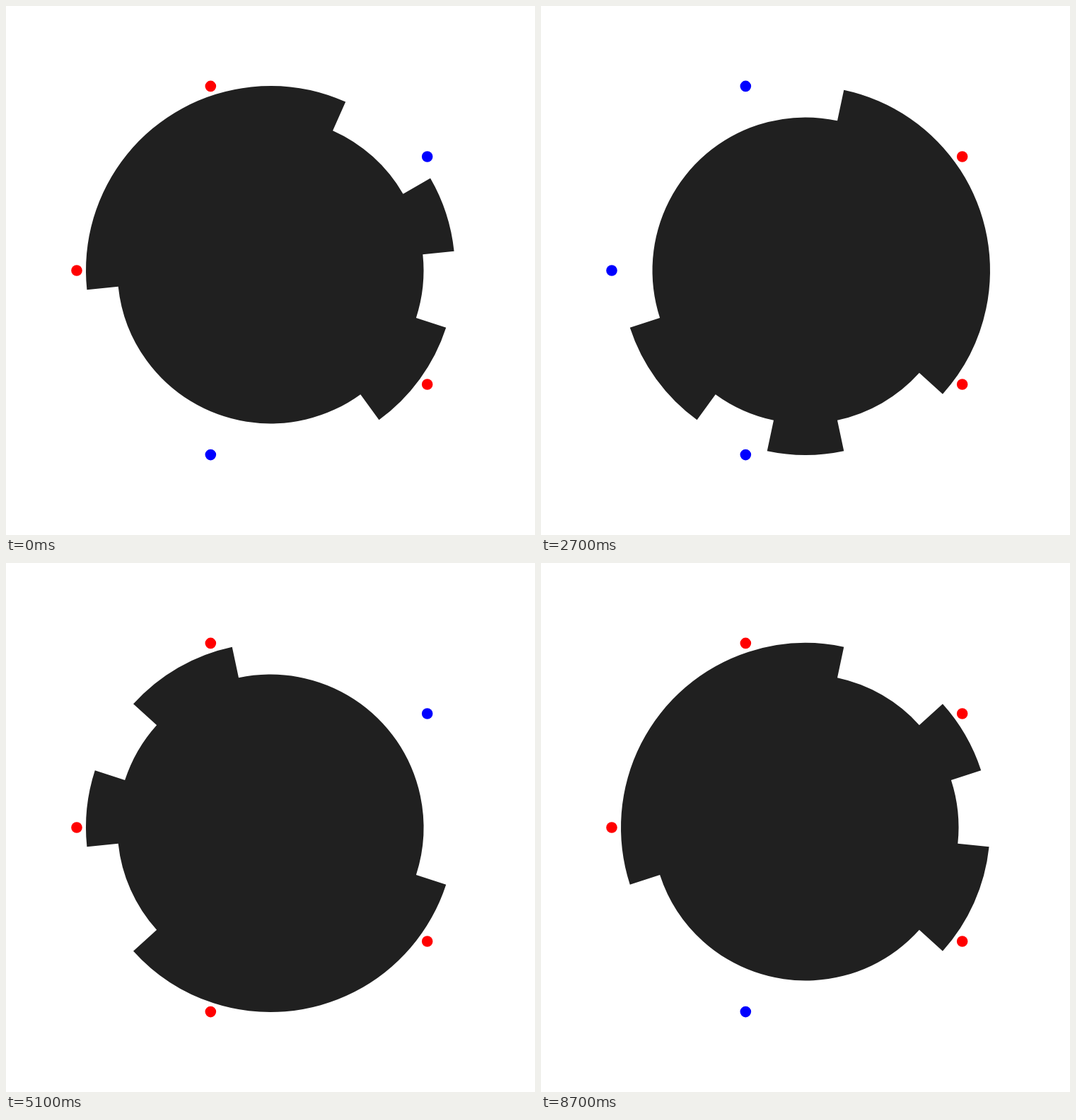
These frames come from a looping animation (748 by 748 pixels, 9 s). An HTML page with a canvas:

```html
<!DOCTYPE html>
<html lang="en">
<head>
<meta charset="utf-8">
<title>Single-track Gray code disc</title>
<style>
  html, body { margin: 0; width: 100%; height: 100%; overflow: hidden; background: #fff; }
  canvas { display: block; width: 748px; height: 748px; }
</style>
</head>
<body>
<canvas id="stage"></canvas>
<script>
const SIZE = 748, CENTER = SIZE / 2;
const STEPS = 30, STEP_MS = 300, STEP_DEG = 360 / STEPS;
const INNER = 216.5, OUTER = 261;
const SENSOR_RING = 274, SENSOR_RADIUS = 7.8;

// Raised sectors as [start, end], clockwise degrees from the right.
const SECTORS = [[-30, -6], [18, 54], [174, 294]];
const SENSORS = [36, 108, 180, 252, 324];

const canvas = document.getElementById('stage');
const ctx = canvas.getContext('2d');
const ratio = window.devicePixelRatio || 1;
canvas.width = canvas.height = Math.round(SIZE * ratio);
ctx.scale(ratio, ratio);

const rad = deg => deg * Math.PI / 180;
const wrap = deg => ((deg % 360) + 360) % 360;

function isRaised(angle, turn) {
  return SECTORS.some(([start, end]) => wrap(angle - turn - start) < end - start);
}

function drawDisc(turn) {
  ctx.fillStyle = '#202020';
  ctx.beginPath();
  SECTORS.forEach(([start, end], i) => {
    const next = SECTORS[(i + 1) % SECTORS.length][0];
    ctx.arc(CENTER, CENTER, OUTER, rad(start + turn), rad(end + turn));
    ctx.arc(CENTER, CENTER, INNER, rad(end + turn), rad(end + wrap(next - end) + turn));
  });
  ctx.closePath();
  ctx.fill();
}

function drawSensor(angle, turn) {
  const x = CENTER + SENSOR_RING * Math.cos(rad(angle));
  const y = CENTER + SENSOR_RING * Math.sin(rad(angle));
  ctx.fillStyle = isRaised(angle, turn) ? '#f00' : '#00f';
  ctx.beginPath();
  ctx.arc(x, y, SENSOR_RADIUS, 0, 2 * Math.PI);
  ctx.fill();
}

function draw(ms) {
  const turn = Math.floor(ms / STEP_MS) % STEPS * STEP_DEG;
  ctx.fillStyle = '#fff';
  ctx.fillRect(0, 0, SIZE, SIZE);
  drawDisc(turn);
  SENSORS.forEach(angle => drawSensor(angle, turn));
}

const startTime = performance.now();
function tick() {
  draw(performance.now() - startTime);
  requestAnimationFrame(tick);
}
tick();
</script>
</body>
</html>
```
